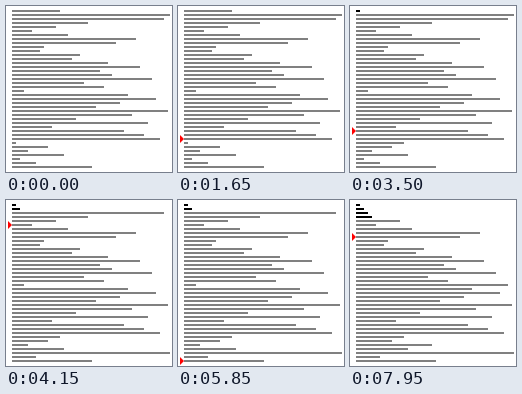
An HTML page with a canvas that plays this animation: 166 px wide and 166 px high, repeating every 8 s.

```html
<!DOCTYPE html>
<html lang="en">
<head>
<meta charset="utf-8">
<title>Selection sort</title>
<style>
html, body { margin: 0; width: 100%; height: 100%; overflow: hidden; background: #fff; }
canvas { display: block; }
</style>
</head>
<body>
<canvas id="stage" width="166" height="166"></canvas>
<script>
const ctx = document.getElementById("stage").getContext("2d");
const STEP = 50, LOOP = 8000;
const LEFT = 6, RIGHT = 164, PITCH = 4;
const START = [
  12, 40, 38, 19, 11, 5, 14, 31, 26, 8,
  7, 17, 15, 24, 32, 22, 25, 35, 18, 23,
  3, 29, 36, 27, 21, 39, 30, 16, 34, 10,
  28, 33, 37, 1, 9, 4, 13, 2, 6, 20
];

// Each pass scans from the first unsorted row to the end, then swaps in the minimum.
function stateAt(step) {
  const bars = START.slice();
  let sorted = 0;
  let scan = step - 1;
  while (scan >= bars.length - sorted) {
    scan -= bars.length - sorted;
    const min = bars.indexOf(Math.min(...bars.slice(sorted)), sorted);
    [bars[sorted], bars[min]] = [bars[min], bars[sorted]];
    sorted++;
  }
  return { bars, sorted, marker: scan < 0 ? -1 : sorted + scan };
}

function drawMarker(row) {
  const y = row * PITCH + 5;
  ctx.fillStyle = "#f00";
  ctx.beginPath();
  ctx.moveTo(2, y - 4);
  ctx.lineTo(6, y);
  ctx.lineTo(2, y + 4);
  ctx.fill();
}

function draw(step) {
  const { bars, sorted, marker } = stateAt(step);
  ctx.fillStyle = "#fff";
  ctx.fillRect(0, 0, 166, 166);
  bars.forEach((value, row) => {
    ctx.fillStyle = row < sorted ? "#000" : "#808080";
    ctx.fillRect(LEFT, row * PITCH + 4, Math.min(value * 4, RIGHT - LEFT), 2);
  });
  if (marker >= 0) drawMarker(marker);
}

const begin = performance.now();
function tick() {
  const time = (performance.now() - begin) % LOOP;
  draw(Math.floor(time / STEP));
  requestAnimationFrame(tick);
}
tick();
</script>
</body>
</html>
```
